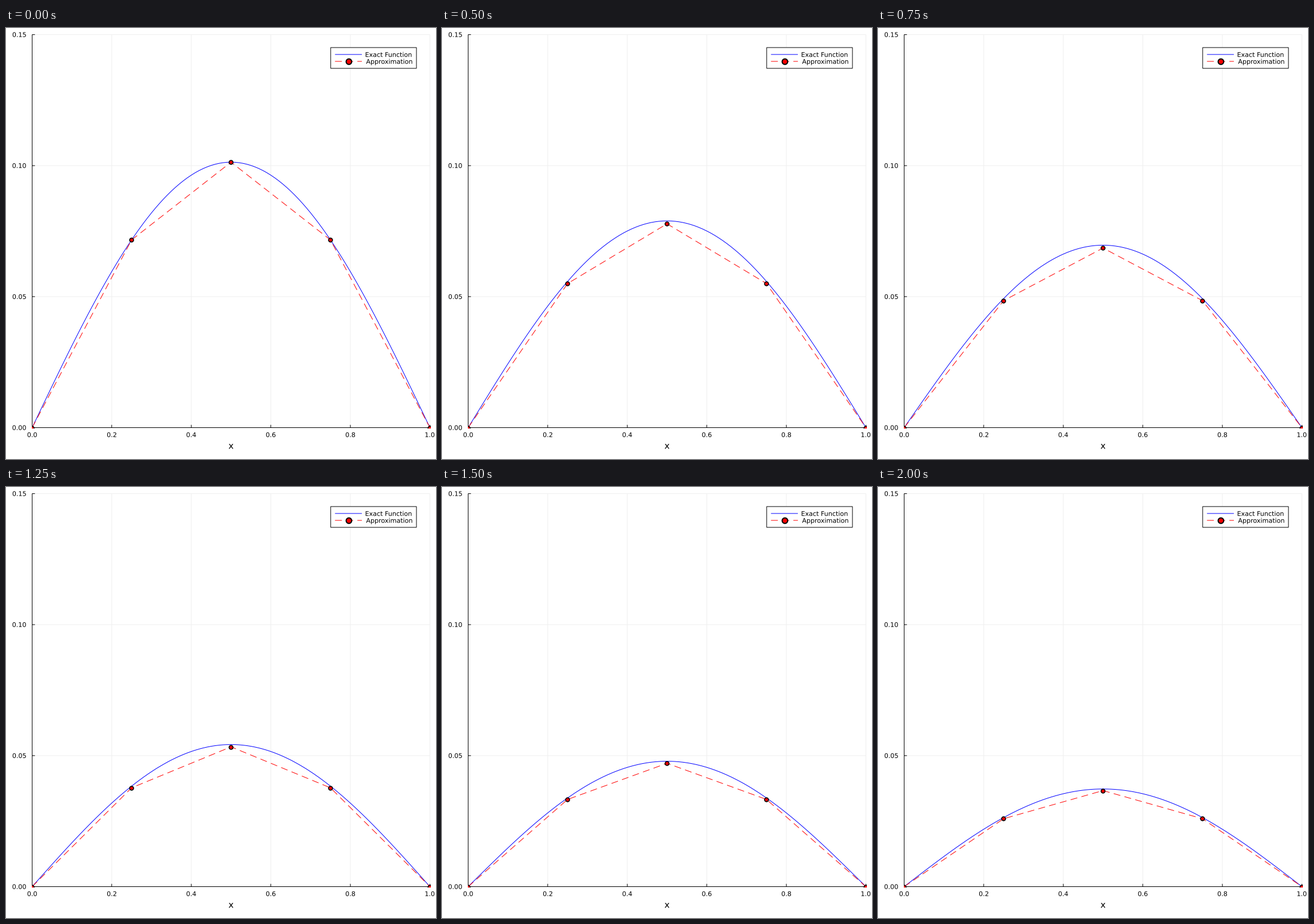
A matplotlib script that plays this animation: 748x749 px, repeating every 2.25 s.

```python
import numpy as np
import matplotlib.pyplot as plt
from matplotlib.animation import FuncAnimation
from matplotlib.patches import PathPatch, Rectangle
from matplotlib.textpath import TextPath
from matplotlib.transforms import Affine2D

WIDTH, HEIGHT, DPI = 748, 749, 64
PX = 72 / DPI  # points per pixel
LEFT, RIGHT, TOP, BOTTOM = 45.5, 737.4, 11.5, 694.5
Y_MAX = 0.15
FRAMES, INTERVAL, TIME_STEP = 9, 250, 1 / 8
SMALL, LARGE = 11.11, 15.28
DASH_UNIT = WIDTH / 500
TICK = 4.8

plt.rcParams["path.snap"] = False
fig = plt.figure(figsize=(WIDTH / DPI, HEIGHT / DPI), dpi=DPI, facecolor="white")
ax = fig.add_axes([0, 0, 1, 1])
ax.set_xlim(0, WIDTH)
ax.set_ylim(HEIGHT, 0)
ax.axis("off")


def to_px(x, y):
    return LEFT + (RIGHT - LEFT) * x, BOTTOM - (BOTTOM - TOP) * y / Y_MAX


def line(xs, ys, color="black", **style):
    return ax.plot(xs, ys, color=color, lw=PX, solid_capstyle="butt",
                   dash_capstyle="butt", **style)[0]


def dashed(xs, ys, **style):
    return line(xs, ys, "red", dashes=(8 * DASH_UNIT, 5 * DASH_UNIT), **style)


def dots(xs, ys, radius, edge, **style):
    return ax.plot(xs, ys, ls="none", marker="o", ms=2 * radius * PX, mfc="red",
                   mec="black", mew=edge * PX, snap=False, **style)[0]


def label(text, x, y, size=SMALL, align=0.5, baseline=False):
    """Place text by its ink box; align 0 is left, 1 is right."""
    path = TextPath((0, 0), text, size=size, prop={"family": "DejaVu Sans"})
    box = path.get_extents()
    dx = x - box.x0 - align * box.width
    dy = y if baseline else y + (box.y0 + box.y1) / 2
    placed = Affine2D().scale(1, -1).translate(dx, dy).transform_path(path)
    ax.add_patch(PathPatch(placed, fc="black", lw=0, zorder=5))


def draw_axes():
    for value in np.linspace(0, 1, 6):
        x, _ = to_px(value, 0)
        line([x, x], [TOP, BOTTOM], "#efefef", zorder=1)
        line([x, x], [BOTTOM, BOTTOM - TICK], zorder=2)
        label(f"{value:.1f}", x, 706.8)
    for value in np.linspace(0, Y_MAX, 4):
        _, y = to_px(0, value)
        line([LEFT, RIGHT], [y, y], "#efefef", zorder=1)
        line([LEFT, LEFT + TICK], [y, y], zorder=2)
        label(f"{value:.2f}", 34.6, y, align=1)
    line([LEFT, RIGHT], [BOTTOM, BOTTOM], zorder=2)
    line([LEFT, LEFT], [TOP, BOTTOM], zorder=2)
    label("x", (LEFT + RIGHT) / 2, 727, LARGE)


def draw_legend():
    ax.add_patch(Rectangle((564.8, 34), 149.2, 36.1, fc="white", ec="black",
                           lw=PX, zorder=4))
    line([572.3, 619.1], [46, 46], "blue", zorder=5)
    dashed([572.3, 619.1], [58, 58], zorder=5)
    dots([595.7], [58], 4.8, 2, zorder=6)
    label("Exact Function", 625.7, 50.2, align=0, baseline=True)
    label("Approximation", 626.5, 62.2, align=0, baseline=True)


draw_axes()
draw_legend()

fine = np.linspace(0, 1, 101)
nodes = np.linspace(0, 1, 5)
exact = line([], [], "blue", zorder=3)
approx = dashed([], [], zorder=3.1)
markers = dots([], [], 3.4, 1.6, zorder=3.2)
plot_area = Rectangle((LEFT - 0.5, TOP), RIGHT - LEFT + 1, BOTTOM - TOP + 0.5,
                      transform=ax.transData)
for artist in (exact, approx, markers):
    artist.set_clip_path(plot_area)


def update(frame):
    amplitude = np.exp(-frame * TIME_STEP) / np.pi**2
    # The numerical solution settles slightly below the exact one.
    ratio = 1 - 0.0165 * (1 - 0.37**frame)
    exact.set_data(*to_px(fine, amplitude * np.sin(np.pi * fine)))
    points = to_px(nodes, ratio * amplitude * np.sin(np.pi * nodes))
    approx.set_data(*points)
    markers.set_data(*points)
    return exact, approx, markers


anim = FuncAnimation(fig, update, frames=FRAMES, interval=INTERVAL,
                     repeat=True, repeat_delay=0, blit=False)
plt.show()
```
